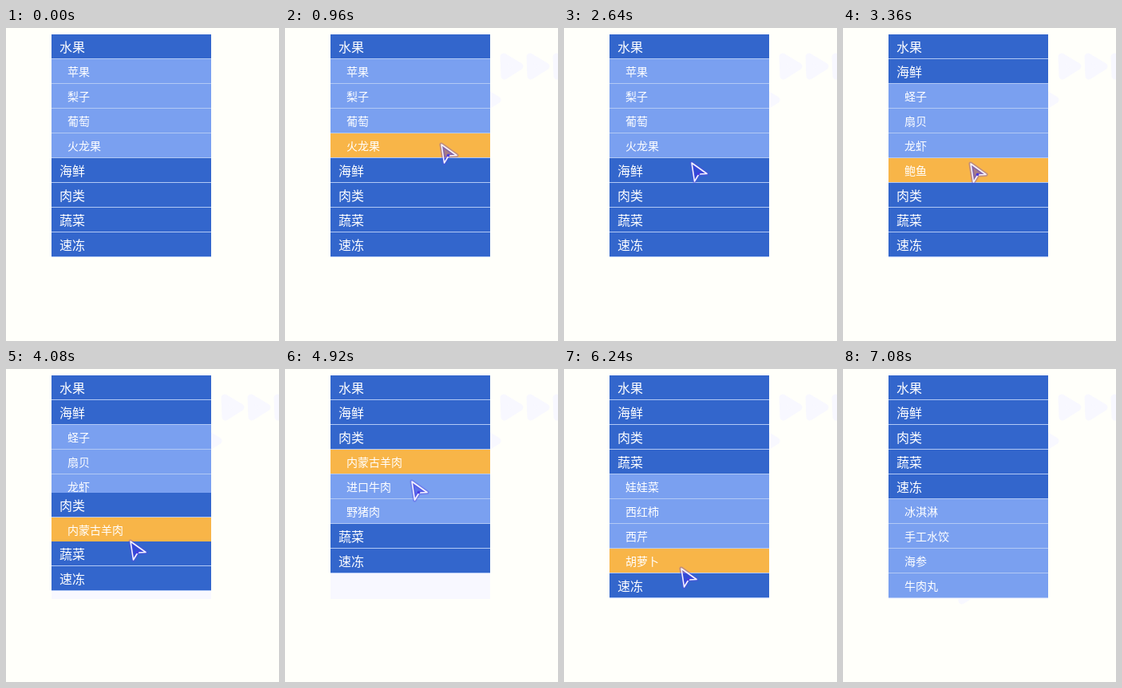
These frames come from a looping animation (342x392 px, 7680 ms). An HTML page:

```html
<!DOCTYPE html>
<html lang="zh-CN">
<head>
<meta charset="utf-8">
<title>Accordion menu</title>
<style>
  html, body { margin: 0; width: 100%; height: 100%; overflow: hidden; background: #fffffa; }
  #stage { position: relative; width: 342px; height: 392px; overflow: hidden; }
  svg { position: absolute; left: 0; top: 0; }
  #paper { position: absolute; left: 57px; top: 8px; width: 200px; height: 280px; background: #f8f8ff; }
  #menu {
    position: absolute; left: 57px; top: 8px; width: 200px; color: #fff;
    font-family: "Noto Sans CJK SC", "Noto Sans CJK", sans-serif;
  }
  .head, .item {
    box-sizing: border-box; height: 31px; line-height: 30px;
    border-bottom: 1px solid #b2c9f5; white-space: nowrap;
  }
  .head { padding-left: 10px; font-size: 16px; background: #3366cc; }
  .item { padding-left: 20px; font-size: 14px; background: #7aa0f0; }
  .item.hover { background: #f8b548; }
  .list { overflow: hidden; }
</style>
</head>
<body>
<div id="stage">
  <svg id="trail" width="342" height="392" fill="#f8f8ff" stroke="#f8f8ff" stroke-width="9" stroke-linejoin="round"></svg>
  <div id="paper"></div>
  <div id="menu"></div>
  <svg width="342" height="392">
    <g id="cursor" stroke-linejoin="round">
      <path d="M0 0L19 13.5L9 14L3.5 23Z" fill="none" stroke="#5a46e6" stroke-opacity=".35" stroke-width="5"/>
      <path d="M0 0L19 13.5L9 14L3.5 23Z" fill="#3028e0" fill-opacity=".4" stroke="#f6f2ff" stroke-width="1.6"/>
      <circle cx="8.5" cy="13.5" r="1.8" fill="#4a3ae0"/>
    </g>
  </svg>
</div>
<script>
const LOOP = 7680, STEP = 120, MOVE = 400, ROW = 31, LEFT = 57, TOP = 8, WIDTH = 200;
const HOVER_LAG = 60, CURSOR_IN = 120, CURSOR_OUT = 7080;

// Each group opens at its time, closing the one before it.
const groups = [
  { opens: -MOVE, title: '水果', names: ['苹果', '梨子', '葡萄', '火龙果'] },
  { opens: 2840, title: '海鲜', names: ['蛏子', '扇贝', '龙虾', '鲍鱼'] },
  { opens: 3927, title: '肉类', names: ['内蒙古羊肉', '进口牛肉', '野猪肉'] },
  { opens: 5800, title: '蔬菜', names: ['娃娃菜', '西红柿', '西芹', '胡萝卜'] },
  { opens: 6675, title: '速冻', names: ['冰淇淋', '手工水饺', '海参', '牛肉丸'] }
];

// Pointer stops; it rests at each one until the next move is due.
const stops = [
  { at: CURSOR_IN, x: 338, y: 34 },
  { at: 360, x: 272, y: 34 },
  { at: 480, x: 244, y: 76 },
  { at: 960, x: 196, y: 146 },
  { at: 1560, x: 184, y: 117 },
  { at: 2040, x: 172, y: 84 },
  { at: 2640, x: 160, y: 169 },
  { at: 3720, x: 154, y: 208 },
  { at: 4080, x: 156, y: 216 },
  { at: 4800, x: 158, y: 116 },
  { at: 4920, x: 159, y: 141 },
  { at: 5280, x: 157, y: 214 },
  { at: 6240, x: 147, y: 250 },
  { at: 6480, x: 146, y: 264 },
  { at: 6960, x: 318, y: 206 }
];
// Moments at which the pointer leaves a faint print on the page.
const printTimes = [120, 240, 360, 480, 6480];

const $ = id => document.getElementById(id);

function add(parent, cls, text = '') {
  const el = document.createElement('div');
  el.className = cls;
  el.textContent = text;
  return parent.appendChild(el);
}

function swing(t, start, length = MOVE) {
  const x = Math.min(1, Math.max(0, (t - start) / length));
  return 0.5 - Math.cos(Math.PI * x) / 2;
}

function pointer(t) {
  let { x, y } = stops[0];
  for (let i = 1; i < stops.length; i++) {
    const to = stops[i];
    const start = Math.max(stops[i - 1].at, to.at - MOVE);
    const p = swing(t, start, to.at - start);
    x += (to.x - x) * p;
    y += (to.y - y) * p;
  }
  return { x: Math.round(x), y: Math.round(y) };
}

function show(el, on) {
  el.style.visibility = on ? 'visible' : 'hidden';
}

for (const group of groups) {
  add($('menu'), 'head', group.title);
  group.el = add($('menu'), 'list');
  group.items = group.names.map(name => add(group.el, 'item', name));
}

const prints = printTimes.map(time => {
  const { x, y } = pointer(time);
  const el = document.createElementNS('http://www.w3.org/2000/svg', 'path');
  el.setAttribute('d', `M${x + 2} ${y + 2}l20 12l-19 12Z`);
  $('trail').appendChild(el);
  return { el, time };
});

function draw(t) {
  const visible = t >= CURSOR_IN && t < CURSOR_OUT;
  const tip = pointer(t), hot = pointer(t - HOVER_LAG);
  show($('cursor'), visible);
  $('cursor').setAttribute('transform', `translate(${tip.x} ${tip.y})`);

  const inside = visible && hot.x >= LEFT && hot.x < LEFT + WIDTH;
  let top = TOP;
  groups.forEach(({ opens, el, items }, i) => {
    const next = groups[i + 1];
    const part = swing(t, opens) - (next ? swing(t, next.opens) : 0);
    const height = Math.max(0, Math.ceil(items.length * ROW * part - 0.2));
    top += ROW;
    el.style.height = height + 'px';
    const over = inside && hot.y >= top && hot.y < top + height ? Math.floor((hot.y - top) / ROW) : -1;
    items.forEach((item, n) => item.classList.toggle('hover', n === over));
    top += height;
  });

  show($('paper'), t >= groups[1].opens);
  prints.forEach(p => show(p.el, t >= p.time));
}

const begin = performance.now();
function tick() {
  const t = (performance.now() - begin) % LOOP;
  draw(Math.floor(t / STEP) * STEP);
  requestAnimationFrame(tick);
}
draw(0);
requestAnimationFrame(tick);
</script>
</body>
</html>
```
